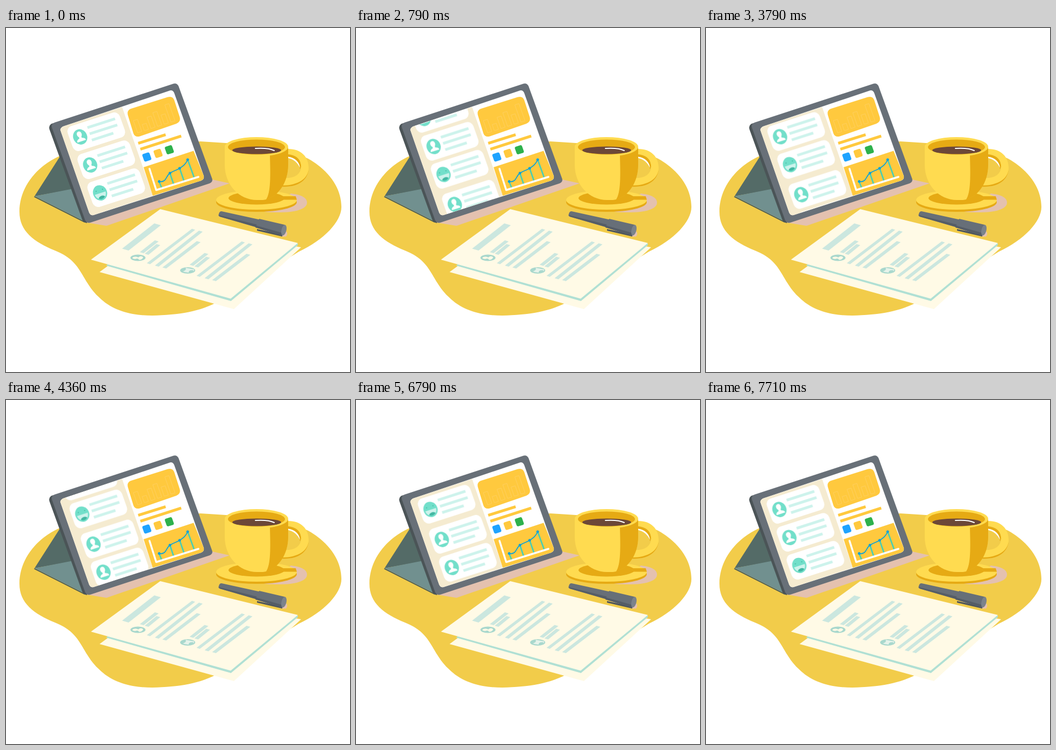
These frames come from a looping animation (640 px wide and 640 px high, 8 s). An HTML page without scripts:

```html
<!DOCTYPE html>
<html lang="en">
<head>
<meta charset="utf-8">
<title>Desk with tablet</title>
<style>
  html, body { margin: 0; width: 100%; height: 100%; overflow: hidden; background: #fff; }
  svg { display: block; width: 100%; height: 100%; }
  .paper { fill: #fffae6; }
  .ink { fill: #cbe7df; }
  .gold { fill: #ffc93e; }
  .cup { fill: #ffdb50; }
  .shade { fill: #e6aa14; }
  .shadow { fill: #e4c1af; }
  .line { fill: none; stroke-linecap: round; stroke-linejoin: round; }
  .list { animation: scroll 8s infinite; }
  @keyframes scroll {
    0%, 1.25% { transform: translate(0, 0); animation-timing-function: cubic-bezier(.7, 0, .3, 1); }
    16.9% { transform: translate(-18.5px, -52px); animation-timing-function: linear; }
    46.2% { transform: translate(-18.7px, -52.3px); animation-timing-function: cubic-bezier(.7, 0, .3, 1); }
    59.87%, 84.86% { transform: translate(-37.2px, -106px); animation-timing-function: step-end; }
    84.87% { transform: translate(-36.4px, -103.2px); animation-timing-function: cubic-bezier(.6, 0, .4, 1); }
    96.37%, 100% { transform: translate(-59.5px, -159px); }
  }
</style>
</head>
<body>
<svg viewBox="0 0 640 640">
  <defs>
    <clipPath id="pane"><path d="M108 182.500L216 147L273 312L163 348Q157 349.500 154.500 343L101.500 191Q100 185.500 108 182.500Z"/></clipPath>

    <g id="card">
      <rect x="-51" y="-24.500" width="102" height="49" rx="11" fill="#fff"/>
      <path d="M-13 -12.300h54M-13 0h54M-13 12.300h42" stroke="#cdf3ec" stroke-width="5"/>
      <ellipse cx="-31.500" rx="13" ry="14.500" fill="#72dfca"/>
    </g>
    <g id="person">
      <use href="#card"/>
      <path d="M-31.500 -10.500c5.500 0 5.500 8 2.300 10.500v2.500c4 1 6 2.500 6 6h-16.600c0-3.500 2-5 6-6v-2.500c-3.200-2.500-3.200-10.500 2.300-10.500z" fill="#fff"/>
    </g>
    <g id="smile">
      <use href="#card"/>
      <g fill="#42b7a2">
        <circle cx="-37.500" cy="-5" r="1"/><circle cx="-25" cy="-5" r="1"/>
        <path d="M-42 .5h21c-.5 7-5 11-10.500 11s-10-4-10.500-11z" fill="#cdf3ec"/>
        <path d="M-37.500 9.500c2-4 10-5 12.500-.5c-3 3.300-9 3.800-12.500 .5z"/>
      </g>
    </g>
    <g id="trio">
      <use href="#person"/>
      <use href="#person" y="55.400"/>
      <use href="#smile" y="110.500"/>
    </g>

    <g id="entry" class="ink">
      <path d="M249 417l28-22 7 2-28 22zM258 420l22-18 7 2-22 18z"/>
      <path d="M262 437.500l84-64 6 2-84 64zM277 442l82-65 7 2-82 65zM291 445.500l64-49 7 2-64 49z"/>
      <ellipse cx="245.500" cy="427.500" rx="14" ry="6" fill="#a9d8cd"/>
    </g>
  </defs>

  <path fill="#f2cc4a" d="M100 238C55 258 25 298 25 342C25 378 52 398 91 414C142 434 138 466 171 499C198 527 235 535 272 535C325 534 372 526 405 502L545 416C592 394 624 360 624 333C624 300 604 267 562 243C505 217 437 216 362 211L200 220Z"/>

  <!-- tablet -->
  <path class="shadow" d="M150 362L187 368L390 298L416 289L375 280Z"/>
  <path fill="#546b67" d="M101 238L53 313L125 300Z"/>
  <path fill="#71908f" d="M53 313L125 299L148 361Z"/>
  <path class="line" stroke="#455653" stroke-width="1.500" d="M53 314L146 361"/>
  <path fill="#4b5457" d="M88 177Q78 180 81 189L142 357Q144 362 151 363Z"/>
  <path fill="#687078" d="M90 176L312 103.500Q318 102 321 108L383 279Q386 286 379 289L157 362Q150 364 147 357L86 187Q83 179 90 176Z"/>
  <path fill="#fff" d="M108 182.500L303 117Q310 114 313 121L367.500 274Q370 281 363 284L163 348Q157 349.500 154.500 343L101.500 191Q100 185.500 108 182.500Z"/>

  <g clip-path="url(#pane)">
    <path fill="#f5ebd0" d="M80 100H290V360H80Z"/>
    <g class="list">
      <use href="#trio" transform="matrix(.952 -.306 .335 .942 168 193)"/>
      <use href="#trio" transform="matrix(.952 -.306 .335 .942 226 353)"/>
    </g>
  </g>

  <path class="gold" d="M233 150L301 128.500Q310 126 313 134L323 165Q326 174 317 178L249 201.500Q240 204 237 196L227 163Q224 153 233 150Z"/>
  <path transform="matrix(.952 -.306 .335 .942 245 195)" fill="none" stroke="#ffd163" stroke-width=".8" d="M0 0v-24h8v24zM13 0v-12h8v12zM26 0v-22h8v22zM39 0v-27h8v27zM52 0v-18h8v18zM65 0v-34h8v34z"/>
  <path stroke="#ffc93e" stroke-width="5" d="M246 214.500L297 198.500M250 225.500L326 201"/>
  <g transform="matrix(.952 -.306 .335 .942 262 240)">
    <rect x="-7" y="-7.500" width="14" height="15" rx="3" fill="#1fa3ff"/>
    <rect x="15" y="-7.500" width="14" height="15" rx="3" class="gold"/>
    <rect x="37" y="-7.500" width="14" height="15" rx="3" fill="#2eb14c"/>
  </g>
  <path class="gold" d="M256 259L349 228.500L367.500 274Q370 281 363 284L273 312Z"/>
  <path fill="none" stroke="#50ceaf" stroke-width="2.800" d="M285 286l4.500 11M305 270l7 21M323 261l8 23M338 245l12 33"/>
  <path class="line" stroke="#fff" stroke-width="3.500" d="M267 262L279.500 301.500L358 277"/>
  <path class="line" stroke="#0aa2d8" stroke-width="1.800" d="M285 286C300 287 297 275 305 270S317 265 323 261S334 254 338 245"/>
  <path class="line" stroke="#0aa2d8" stroke-width="5" d="M285 285.500h0M305 270h0M323 261h0M338 245h0"/>

  <!-- cup -->
  <path class="shadow" d="M480 342C530 346 560 339 560 325C560 316 550 310 530 308Z"/>
  <ellipse class="shade" cx="466" cy="324" rx="75" ry="18"/>
  <ellipse class="cup" cx="466" cy="320" rx="75" ry="18"/>
  <ellipse class="shade" cx="466" cy="316.500" rx="52" ry="12"/>
  <path class="shade" d="M510 313H539L541 319.500H510Z"/>
  <path class="shade" d="M512 291C540 293 557 284 563 264C560 284 543 297 512 295Z"/>
  <path class="cup" fill-rule="evenodd" d="M523 225C548 224 563 239 563 260C563 280 544 293 513 293L518 279C538 280 549 271 549 258C549 244 540 236 524 235Z"/>
  <path class="shade" d="M524 235C540 236 549 245 549 258L547 263C546 250 538 241 524 239.500Z"/>
  <path fill="#fff" d="M525 239.500C538 241 546 250 547 260C542 250 535 244 525 242Z"/>
  <path class="cup" d="M407 221V255C407 291 433 320 467 320H478C503 317 525 289 525 255V221Z"/>
  <path class="shade" d="M491 237C505 235 519 230 525 222V255C525 287 507 313 484 319C493 306 492 272 491 237Z"/>
  <ellipse class="cup" cx="466" cy="221" rx="59" ry="18"/>
  <ellipse class="shade" cx="466" cy="221.500" rx="53" ry="14"/>
  <ellipse fill="#6c4738" cx="466.500" cy="227.500" rx="45.500" ry="7"/>
  <path class="line" stroke="#fff" stroke-width="2" d="M464 224C479 223 491 224 499 228"/>

  <!-- pen -->
  <path class="shadow" d="M470 373L520 377Q526 382 521 388L514 388Z"/>
  <path fill="#4d555d" d="M467 374L514 384V388L467 377Z"/>
  <path fill="#676f78" d="M401 341L474 357L470 372L398 351Q394 350 396 346Q397 341 401 341Z"/>
  <path fill="#555d66" d="M396 348L468 366V371L398 351Z"/>
  <path fill="#676f78" d="M471 355L518 366Q523 369 521 378Q518 387 513 386L464 371Z"/>
  <path fill="#555d66" d="M464 367L513 381V386L464 371Z"/>
  <ellipse fill="#7b838b" cx="517" cy="376" rx="4.500" ry="10" transform="rotate(14 517 376)"/>

  <!-- papers -->
  <path class="paper" d="M174 454L300 362L549 408L424 523Z"/>
  <path fill="#b0e0d4" d="M186 442L290 360L543 401V404L418.500 508Z"/>
  <path class="paper" d="M158 431L287 337L543 400L418 503.500Z"/>
  <path class="ink" d="M216 410.500L276 363.500L288 367L228 414Z"/>
  <use href="#entry"/>
  <use href="#entry" x="92.500" y="23.500"/>
  <path class="paper" d="M235 428C237 425 242 425 246 427C250 423 255 425 255 427C254 430 250 432 247 431C247 429 245 429 243 429C241 430 237 430 235 428Z"/>
  <path fill="#e6f3ea" d="M334 446L350 449C351 455 343 457 329 453C334 451 336 449 334 446Z"/>
  <path fill="#a9d8cd" d="M340 453C342 450 347 450 349 451C349 455 345 456 340 455Z"/>
</svg>
</body>
</html>
```
